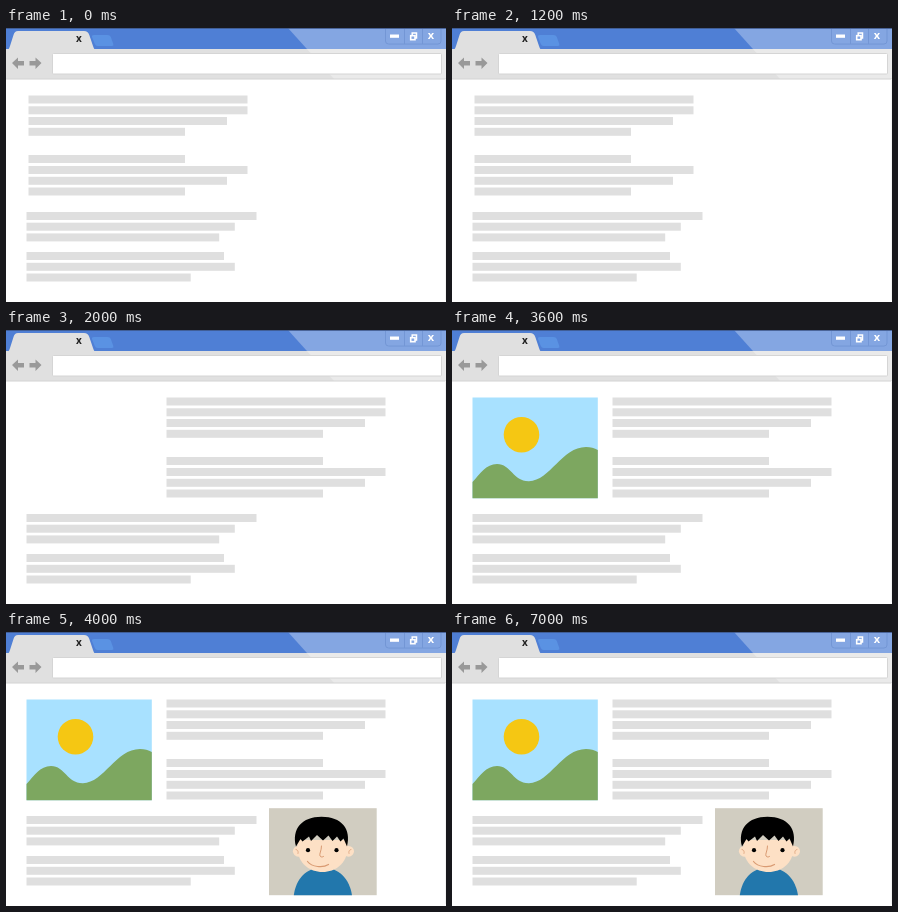
Animation, 440 px wide and 274 px high, one loop 9 s. Source, as an HTML page:

```html
<!DOCTYPE html>
<html lang="en">
<head>
<meta charset="utf-8">
<title>Page layout</title>
<style>
html, body { margin: 0; width: 100%; height: 100%; overflow: hidden; background: #fff; }
svg { display: block; width: 440px; height: 274px; }
text { font-family: "Open Sans", "DejaVu Sans", sans-serif; font-weight: 700; text-anchor: middle; }
</style>
</head>
<body>
<svg viewBox="0 0 440 274">
  <rect width="440" height="274" fill="#fff"/>

  <g id="browser">
    <rect width="440" height="22" fill="#4f7fd5"/>
    <path d="M86 9Q85.500 7 88 7H101.500Q104 7 104.800 9L107.300 16Q108 18 106 18H91.500Q89.500 18 88.800 16Z" fill="#5a92e3"/>
    <rect y="21" width="440" height="30" fill="#e0e0e0"/>
    <path d="M2 22Q3.500 20 4 18L7.500 7Q8.500 3 12 3H78Q82 3 83.300 7L87 18Q87.700 20.500 89 22Z" fill="#e0e0e0"/>
    <path d="M282 0H440V51H328Z" fill="#fff" opacity=".3"/>
    <path d="M0 51H440" stroke="#d2d2d2"/>
    <path d="M0 .5H440" stroke="#3d5688" opacity=".8"/>
    <rect x="46.500" y="25.500" width="389" height="20.500" rx="1" fill="#fff" stroke="#d5d5d5"/>
    <path d="M439.500 51V272" stroke="#f3f3f3"/>
    <path id="arrow" d="M6 35L12 29.500V33H18V37.500H12V41Z" fill="#999"/>
    <use href="#arrow" transform="matrix(-1 0 0 1 41.500 0)"/>
    <text x="72.800" y="13.500" font-size="10" fill="#222">x</text>
    <path d="M379.500 1V13Q379.500 16 382.500 16H432Q435 16 435 13V1M398.500 1V16M416.500 1V16" fill="none" stroke="#7396d5"/>
    <rect x="384" y="6.500" width="9" height="3.300" fill="#fff"/>
    <path d="M406.200 7V5H410.500V10H409" fill="none" stroke="#fff" stroke-width="1.500"/>
    <rect x="404.700" y="7.700" width="4.300" height="4" fill="none" stroke="#fff" stroke-width="1.600"/>
    <text x="425" y="11.300" font-size="11" fill="#fff">x</text>
  </g>

  <g id="upper" fill="#dfdfdf"></g>
  <g id="lower" fill="#dfdfdf"></g>

  <g id="landscape">
    <rect x="20.500" y="67.500" width="125.300" height="100.800" fill="#a8e1ff"/>
    <circle cx="69.500" cy="104.700" r="17.800" fill="#f5c713"/>
    <path d="M20.500 152C28 144 34 134 45 134C59 134 61 151.500 77 151.200C98 150.800 110 117 134 117C138.500 117 142.500 118 145.800 120V168.300H20.500Z" fill="#7da760"/>
  </g>

  <g id="portrait">
    <rect x="263" y="176.200" width="107.700" height="87" fill="#d1cdc1"/>
    <path d="M287.800 263.200C290 247 300 235.500 316.500 235.500C333 235.500 343.500 247 346 263.200Z" fill="#2277ac"/>
    <g fill="#fde0c5">
      <circle cx="292.300" cy="219.300" r="5.400"/>
      <circle cx="342.600" cy="219.300" r="5.400"/>
      <path d="M291.500 208H341.500V217C341 231 329.500 240 316.500 240C303.500 240 292 231 291.500 217Z"/>
    </g>
    <path d="M290 214.500C285.500 197 296 184.800 315.500 184.800C335.500 184.800 345.500 197 341 214.500L337.500 206.500L334.500 209.500L331 204.500L326.500 209L322.500 203.500L317 208.500L311 203L305 209L303 204.500L296.500 209.500L294.500 207Z"/>
    <circle cx="302" cy="218.200" r="2.100"/>
    <circle cx="330.500" cy="218.200" r="2.100"/>
    <g fill="none" stroke="#d99a72" stroke-linecap="round">
      <path d="M315.500 214C315.500 219 313 222 314 224C315 225.300 316.500 225.200 317.500 224.500"/>
      <path d="M301.500 229.500C306 235.300 317 236 322.500 232.500" stroke-width="1.200"/>
      <path d="M290 217.500Q293 218 292 221.500M345 217.500Q342 218 343 221.500" stroke-width=".7"/>
    </g>
  </g>
</svg>
<script>
const LOOP = 9000, SHIFT_AT = 2000, LANDSCAPE_AT = 3000, PORTRAIT_AT = 4000;
const $ = id => document.getElementById(id);

function addLines(id, x, lines) {
  $(id).innerHTML = lines.map(([y, w]) =>
    `<rect x="${x}" y="${y}" width="${w}" height="8"/>`).join("");
}

addLines("upper", 22.5, [
  [67.5, 219], [78.3, 219], [89, 198.5], [99.8, 156.5],
  [127, 156.5], [138, 219], [148.8, 198.5], [159.5, 156.5]
]);
addLines("lower", 20.5, [
  [184, 230], [194.7, 208.3], [205.4, 192.7],
  [224, 197.5], [234.8, 208.3], [245.5, 164.2]
]);

const show = (id, on) => $(id).setAttribute("visibility", on ? "visible" : "hidden");

function draw(t) {
  $("upper").setAttribute("transform", `translate(${t >= SHIFT_AT ? 138 : 0})`);
  show("landscape", t >= LANDSCAPE_AT);
  show("portrait", t >= PORTRAIT_AT);
}

const start = performance.now();
function tick() {
  draw((performance.now() - start) % LOOP);
  requestAnimationFrame(tick);
}
tick();
</script>
</body>
</html>
```
